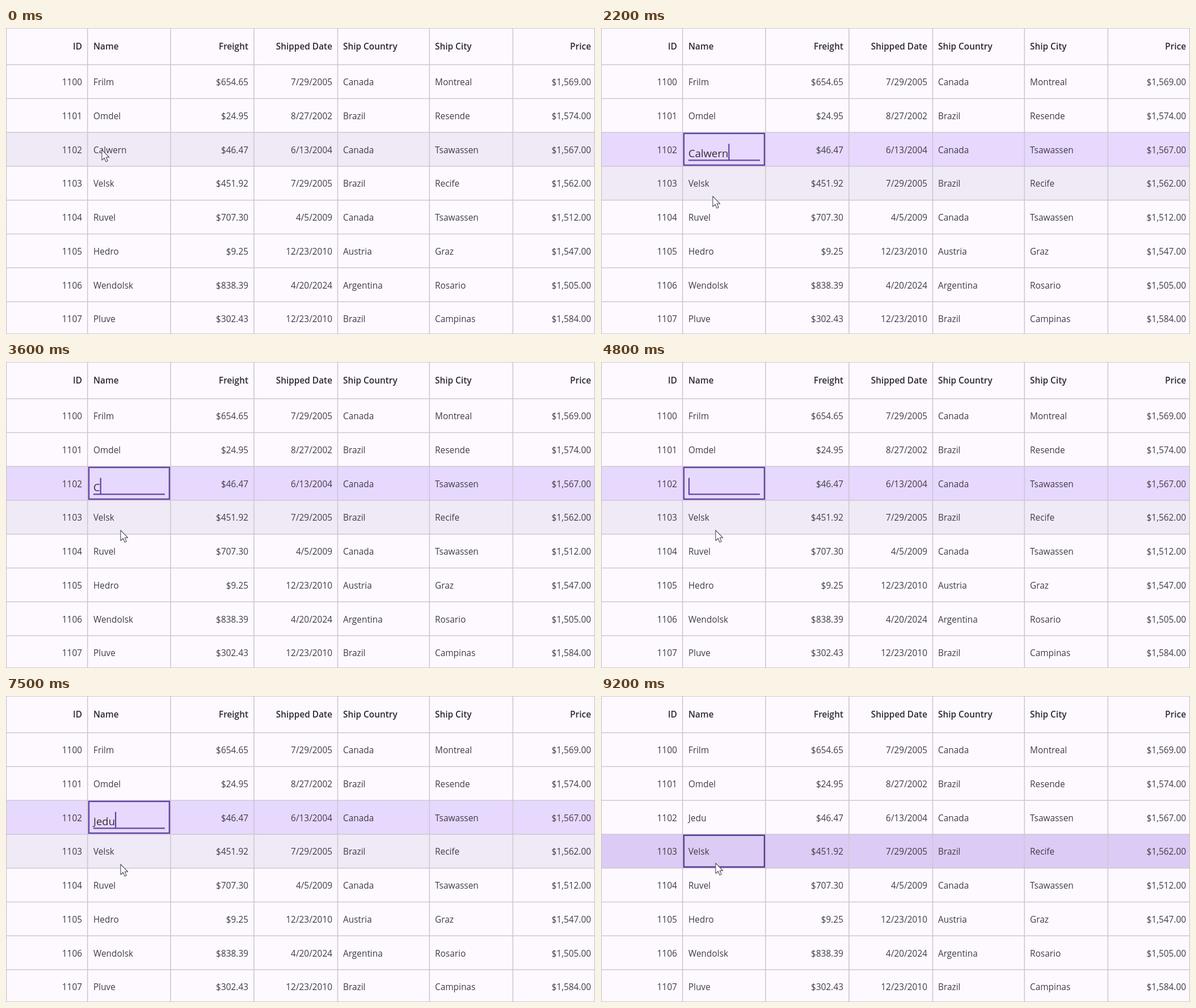
Write an HTML page that moves like this. It is 1038 by 540 pixels and loops after 9.3 s.

```html
<!DOCTYPE html>
<html lang="en">
<head>
<meta charset="utf-8">
<title>Grid cell editing</title>
<style>
  html, body { margin: 0; width: 100%; height: 100%; overflow: hidden; background: #fef9ff; }
  svg { display: block; width: 1038px; height: 540px; }
  text { font: 15.4px "Open Sans", "Noto Sans", sans-serif; fill: #403c45; }
  .head { font-weight: 600; fill: #2c2930; }
  .right { text-anchor: end; }
  #edit { font-size: 18.5px; fill: #302b38; }
</style>
</head>
<body>
<svg id="stage" viewBox="0 0 1038 540"></svg>
<script>
const LOOP = 9300, ROW_TOP = 65, ROW_H = 59.75;
const OLD_NAME = 'Calwern', NEW_NAME = 'Jedu';
const edges = [0.5, 143.7, 290, 437, 584.5, 746.3, 893.3, 1037.5];
const columns = [
  ['ID', 134, 'right'], ['Name', 154, ''], ['Freight', 427, 'right'],
  ['Shipped Date', 575, 'right'], ['Ship Country', 594, ''],
  ['Ship City', 756, ''], ['Price', 1031, 'right']
];
const rows = [
  ['Frilm', '$654.65', '7/29/2005', 'Canada', 'Montreal', '$1,569.00'],
  ['Omdel', '$24.95', '8/27/2002', 'Brazil', 'Resende', '$1,574.00'],
  [OLD_NAME, '$46.47', '6/13/2004', 'Canada', 'Tsawassen', '$1,567.00'],
  ['Velsk', '$451.92', '7/29/2005', 'Brazil', 'Recife', '$1,562.00'],
  ['Ruvel', '$707.30', '4/5/2009', 'Canada', 'Tsawassen', '$1,512.00'],
  ['Hedro', '$9.25', '12/23/2010', 'Austria', 'Graz', '$1,547.00'],
  ['Wendolsk', '$838.39', '4/20/2024', 'Argentina', 'Rosario', '$1,505.00'],
  ['Pluve', '$302.43', '12/23/2010', 'Brazil', 'Campinas', '$1,584.00']
].map((row, i) => [String(1100 + i), ...row]);

const stage = document.getElementById('stage');
function add(tag, attrs, text = '') {
  const el = document.createElementNS('http://www.w3.org/2000/svg', tag);
  for (const key in attrs) el.setAttribute(key, attrs[key]);
  el.textContent = text;
  return stage.appendChild(el);
}
const show = (el, on) => el.setAttribute('visibility', on ? 'visible' : 'hidden');
const rowY = i => ROW_TOP + ROW_H * i;

const bands = rows.map((_, i) => add('rect', { x: 0, y: rowY(i), width: 1038, height: ROW_H }));
const line = d => add('path', { d, fill: 'none', stroke: '#cdc7d1', 'stroke-width': 1.6 });
edges.forEach(x => line(`M${x} 0V540`));
[0.3, ...rows.map((_, i) => rowY(i) - 0.3), 539.7].forEach(y => line(`M0 ${y}H1038`));

columns.forEach(([title, x, align]) => add('text', { x, y: 37.6, class: 'head ' + align }, title));
const cells = rows.map((row, i) => row.map((value, c) =>
  add('text', { x: columns[c][1], y: rowY(i) + 36.1, class: columns[c][2] }, value)));

const frame = add('rect', { x: 146, width: 142, height: 56, fill: 'none', 'stroke-width': 2.4 });
const underline = add('rect', { x: 154, y: 232.3, width: 126, height: 2.2, fill: '#5e429f' });
const edit = add('text', { id: 'edit', x: 154, y: 228 });
const caret = add('rect', { y: 204.5, width: 2.2, height: 29, fill: '#5e429f' });
const pointer = add('path', {
  d: 'M0 0V18.2L4.3 14.3L7.2 21L10.3 19.7L7.4 13.1H12.8Z',
  fill: '#fff', stroke: '#5a5560', 'stroke-width': 1.2, 'stroke-linejoin': 'round'
});

const SELECT = 800, EDIT = 1100, ERASE = 2500, TYPE = 6100, COMMIT = 8500;
const path = [[0, 169, 215], [1300, 169, 215], [2000, 197, 297], [2400, 197, 297],
  [2800, 202, 297], [8000, 202, 297], [8300, 202, 295], [LOOP, 202, 295]];

function pointerAt(t) {
  const k = path.findIndex(p => p[0] > t);
  const [t0, x0, y0] = path[k - 1], [t1, x1, y1] = path[k];
  const u = (t - t0) / (t1 - t0), ease = u * u * (3 - 2 * u);
  return [x0 + (x1 - x0) * ease, y0 + (y1 - y0) * ease];
}

function editedText(t) {
  if (t >= TYPE) return NEW_NAME.slice(0, Math.floor((t - TYPE) / 350) + 1);
  const removed = Math.max(0, Math.floor((t - ERASE) / 200) + 1);
  return OLD_NAME.slice(0, Math.max(0, OLD_NAME.length - removed));
}

function draw(now) {
  const t = Math.floor(now % LOOP / 100) * 100;
  const [px, py] = pointerAt(t);
  const hovered = Math.floor((py - ROW_TOP) / ROW_H);
  const selected = t < SELECT ? -1 : t < COMMIT ? 2 : 3;
  const editing = t >= EDIT && t < COMMIT;

  bands.forEach((band, i) => band.setAttribute('fill',
    i === selected ? (i === hovered ? '#dccbf4' : '#e7d8fe') : i === hovered ? '#f0eaf6' : '#fef9ff'));
  pointer.setAttribute('transform', `translate(${px} ${py})`);

  show(frame, selected >= 0);
  frame.setAttribute('y', rowY(Math.max(selected, 2)) + 1.5);
  frame.setAttribute('stroke', editing ? '#6044a2' : '#523a8d');

  const name = cells[2][1];
  name.textContent = t < COMMIT ? OLD_NAME : NEW_NAME;
  show(name, !editing);
  [underline, edit, caret].forEach(el => show(el, editing));
  edit.textContent = editedText(t);
  caret.setAttribute('x', 154 + (edit.textContent ? edit.getComputedTextLength() : 0));
}

const start = performance.now();
function tick() {
  draw(performance.now() - start);
  requestAnimationFrame(tick);
}
tick();
</script>
</body>
</html>
```
